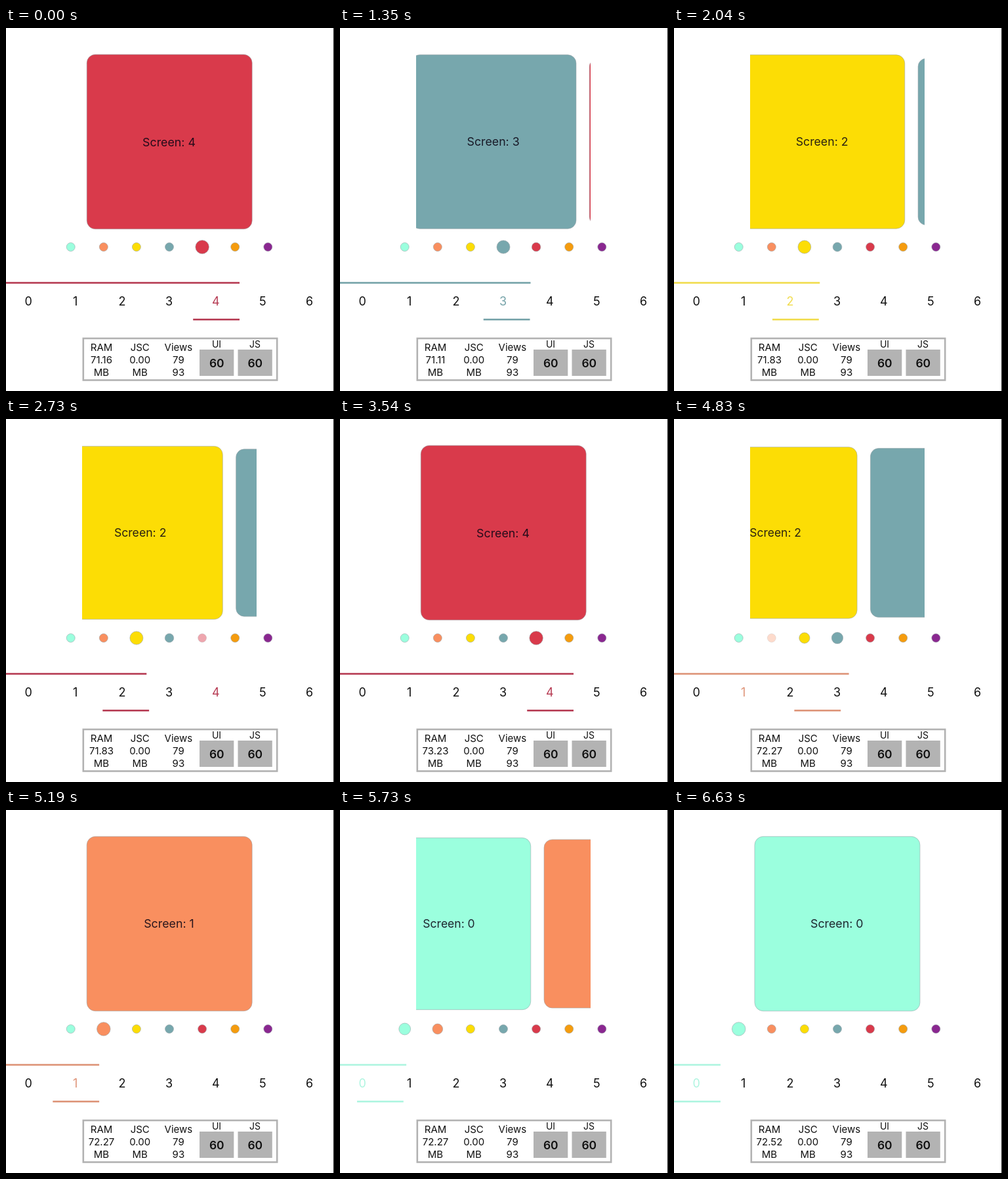
An HTML page with a canvas that plays this animation: 500 by 552 pixels, repeating every 6660 ms.

```html
<!DOCTYPE html>
<html lang="en">
<head>
<meta charset="utf-8">
<title>Carousel with synced indicators</title>
<style>
html, body { margin: 0; width: 100%; height: 100%; overflow: hidden; background: #fff; }
canvas { display: block; }
</style>
</head>
<body>
<canvas width="500" height="552"></canvas>
<script>
const ctx = document.querySelector('canvas').getContext('2d');
const LOOP = 6660, PAGE = 266, TAB = 71.3, LAG = 30;
const COLORS = ['#9bffde', '#f98f5f', '#fcdd05', '#77a7ad', '#d93a4b', '#f59c0e', '#8a2790'];
const ACCENTS = ['#aef5e0', '#de9478', '#f1dc4e', '#76a3a9', '#b63b53', '#f59c0e', '#8a2790'];
const SWIPES = [752, 1510, 3620, 5420];
const TAPS = [
  { start: 2650, from: 2, to: 4 },
  { start: 4670, from: 3, to: 1 }
];
const TAP_TIME = 400;
const MEMORY = [[0, '71.16'], [1000, '71.11'], [1700, '71.83'], [3000, '73.23'], [4100, '72.27'], [5900, '72.52']];

const clamp = v => Math.max(0, Math.min(1, v));
const easeInOut = u => u < 0.5 ? 2 * u * u : 1 - 2 * (1 - u) ** 2;

// Critically damped settle of one swipe, 0 to 1
function settle(ms) {
  const x = Math.max(0, ms) / 130;
  return 1 - (1 + x) * Math.exp(-x);
}

function position(t) {
  let p = 4;
  for (const start of SWIPES) p -= settle(t - start);
  for (const { start, from, to } of TAPS) p += (to - from) * easeInOut(clamp((t - start) / TAP_TIME));
  return p;
}

function activeIndex(t, p) {
  const tap = TAPS.find(({ start }) => t >= start && t < start + TAP_TIME);
  return tap ? tap.to : Math.round(p);
}

function text(str, x, y, size, color = '#111', weight = 400) {
  ctx.font = `${weight} ${size}px Inter, Roboto, sans-serif`;
  ctx.textAlign = 'center';
  ctx.fillStyle = color;
  ctx.fillText(str, x, y);
}

function rect(x, y, w, h, color) {
  ctx.fillStyle = color;
  ctx.fillRect(x, y, w, h);
}

function fillOutlined(color) {
  ctx.fillStyle = color;
  ctx.fill();
  ctx.lineWidth = 1;
  ctx.strokeStyle = 'rgba(150,160,165,.55)';
  ctx.stroke();
}

function drawCards(p) {
  ctx.save();
  ctx.beginPath();
  ctx.rect(116, 30, PAGE, 290);
  ctx.clip();
  COLORS.forEach((color, i) => {
    const offset = i - p;
    if (Math.abs(offset) > 1.1) return;
    const scale = 1 - 0.05 * Math.abs(offset);
    ctx.save();
    ctx.translate(249.2 + offset * PAGE, 173);
    ctx.scale(scale, scale);
    ctx.beginPath();
    ctx.roundRect(-126, -132.7, 252, 265.4, 13);
    fillOutlined(color);
    text('Screen: ' + i, -0.7, 6.5, 17.8, 'rgba(10,5,20,.87)');
    ctx.restore();
  });
  ctx.restore();
}

function drawDots(p, t) {
  COLORS.forEach((color, i) => {
    const tap = TAPS.find(({ to, start }) => to === i && Math.abs(t - start - 160) < 160);
    ctx.globalAlpha = tap ? 1 - 0.68 * clamp(1.6 - Math.abs(t - tap.start - 160) / 100) : 1;
    ctx.beginPath();
    ctx.arc(98.7 + 50.1 * i, 333, 6.5 + 3.8 * clamp(1 - Math.abs(i - p)), 0, 7);
    fillOutlined(color);
  });
  ctx.globalAlpha = 1;
}

function drawTabs(active, underline, progress) {
  const color = ACCENTS[active];
  rect(0, 386.2, TAB * (progress + 1) - 0.5, 2.6, color);
  rect(TAB * underline, 442, TAB - 0.5, 2.6, color);
  for (let i = 0; i < 7; i++) text(i, 34.3 + 71.4 * i, 422, 18, i === active ? color : '#111');
}

function drawMonitor(t) {
  ctx.lineWidth = 2.6;
  ctx.strokeStyle = '#b2b2b2';
  ctx.strokeRect(117.8, 472, 295.4, 63.5);
  const ram = MEMORY.filter(([from]) => t >= from).pop()[1];
  const columns = [['RAM', ram, 'MB'], ['JSC', '0.00', 'MB'], ['Views', '79', '93']];
  columns.forEach((lines, c) =>
    lines.forEach((line, r) => text(line, 145.5 + 58.7 * c, 490.7 + 18.9 * r, 15)));
  ['UI', 'JS'].forEach((name, i) => {
    const x = 295 + 58.5 * i;
    text(name, x + 26, 486, 14);
    rect(x, 489, 52.3, 40, '#b3b3b3');
    text('60', x + 26.3, 515.5, 17.5, '#111', 600);
  });
}

function draw(now) {
  const t = now % LOOP;
  const p = position(t), late = position(t - LAG);
  rect(0, 0, 500, 552, '#fff');
  drawCards(p);
  drawDots(late, t);
  drawTabs(activeIndex(t, p), late, position(t - 2 * LAG));
  drawMonitor(t);
  rect(499, 0, 1, 552, '#333');
}

const begin = performance.now();
function frame() {
  draw(performance.now() - begin);
  requestAnimationFrame(frame);
}
frame();
</script>
</body>
</html>
```
